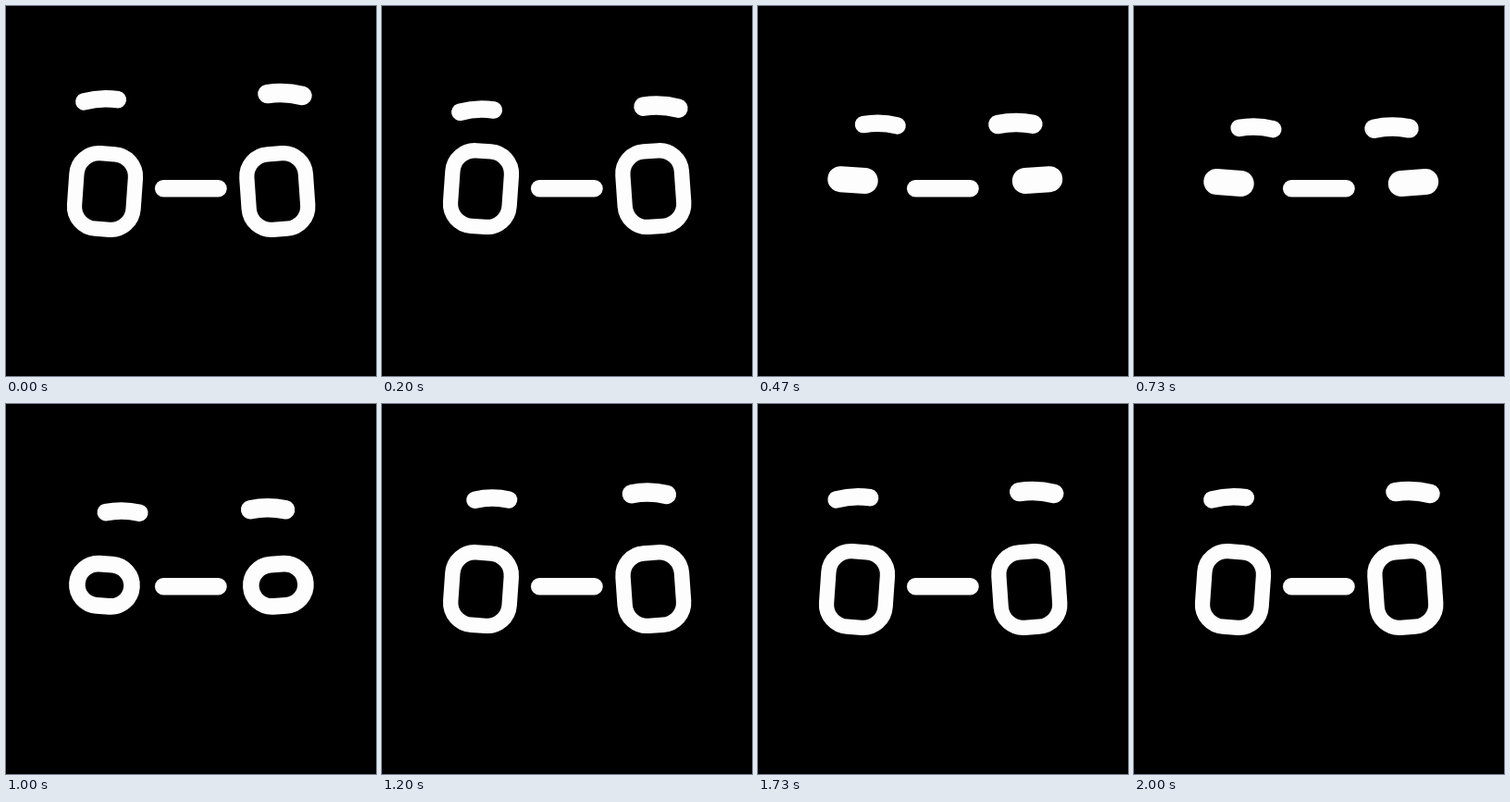
These frames come from a looping animation (400 by 400 pixels, 2070 ms). An HTML page:

```html
<!DOCTYPE html>
<html>
<head>
<meta charset="utf-8">
<style>
html, body { margin: 0; width: 100%; height: 100%; overflow: hidden; background: #000; }
svg { display: block; width: 100%; height: 100%; fill: none; stroke: #fdfdfd; stroke-linecap: round; }
</style>
</head>
<body>
<svg viewBox="0 0 400 400">
  <path id="browL" d="M-18.3 1Q0-3 18.3 1" stroke-width="18.5"/>
  <path id="browR" d="M-19 1Q0-3 19 1" stroke-width="20.5"/>
  <rect id="eyeL"/>
  <rect id="eyeR"/>
  <path d="M170.2 197.2H229.5" stroke-width="18.5"/>
</svg>
<script>
const LOOP = 2070, RATE = 0.015; // steps per ms

const ramp = (t, from, to) => Math.min(1, Math.max(0, (t - from) / (to - from)));
const ease = (t, from, to) => {
  const u = ramp(t, from, to);
  return u * u * (3 - 2 * u);
};
const mix = (a, b, u) => a + (b - a) * u;

const set = (id, attrs) => {
  const el = document.getElementById(id);
  for (const k in attrs) el.setAttribute(k, attrs[k]);
};
const place = (x, y, angle) => `translate(${x} ${y}) rotate(${angle})`;

function drawEye(id, x, y, angle, open, wide) {
  const line = mix(19, 16.3, open);
  const w = mix(54.5, 80, wide) - line, h = mix(28, 98, open) - line;
  set(id, {
    x: -w / 2, y: -h / 2, width: w, height: h, rx: Math.min(24, h / 2),
    'stroke-width': line,
    transform: place(x, y, angle)
  });
}

function draw(now) {
  const t = Math.floor((now % LOOP + 4) * RATE);
  const shut = ease(t, 3, 7), reopen = ease(t, 11, 19);

  // Eyes rise a little around the blink; width opens faster than height
  const open = 1 - shut + reopen, wide = 1 - (1 - open) ** 3;
  const lift = ease(t, 0, 3) - ease(t, 7, 11);
  const eyeY = mix(191, 200.5, open) - 2.9 * lift;
  drawEye('eyeL', mix(102.5, 107, wide), eyeY, 4, open, wide);
  drawEye('eyeR', mix(302, 293.3, wide), eyeY, -4, open, wide);

  // Brows fall, then slide inwards; they rise first and slide back slowly
  const drop = ramp(t, 0, 8) - reopen, slide = shut - ease(t, 10, 27);
  set('browL', { transform: place(mix(102.5, 132.3, slide), mix(101.3, 131.5, drop), mix(-3.5, 2, slide)) });
  set('browR', { transform: place(mix(301.5, 278.3, slide), mix(95, 131.5, drop), mix(3, -0.5, slide)) });
}

let start;
function loop(now) {
  start ??= now;
  draw(now - start);
  requestAnimationFrame(loop);
}
draw(0);
requestAnimationFrame(loop);
</script>
</body>
</html>
```
